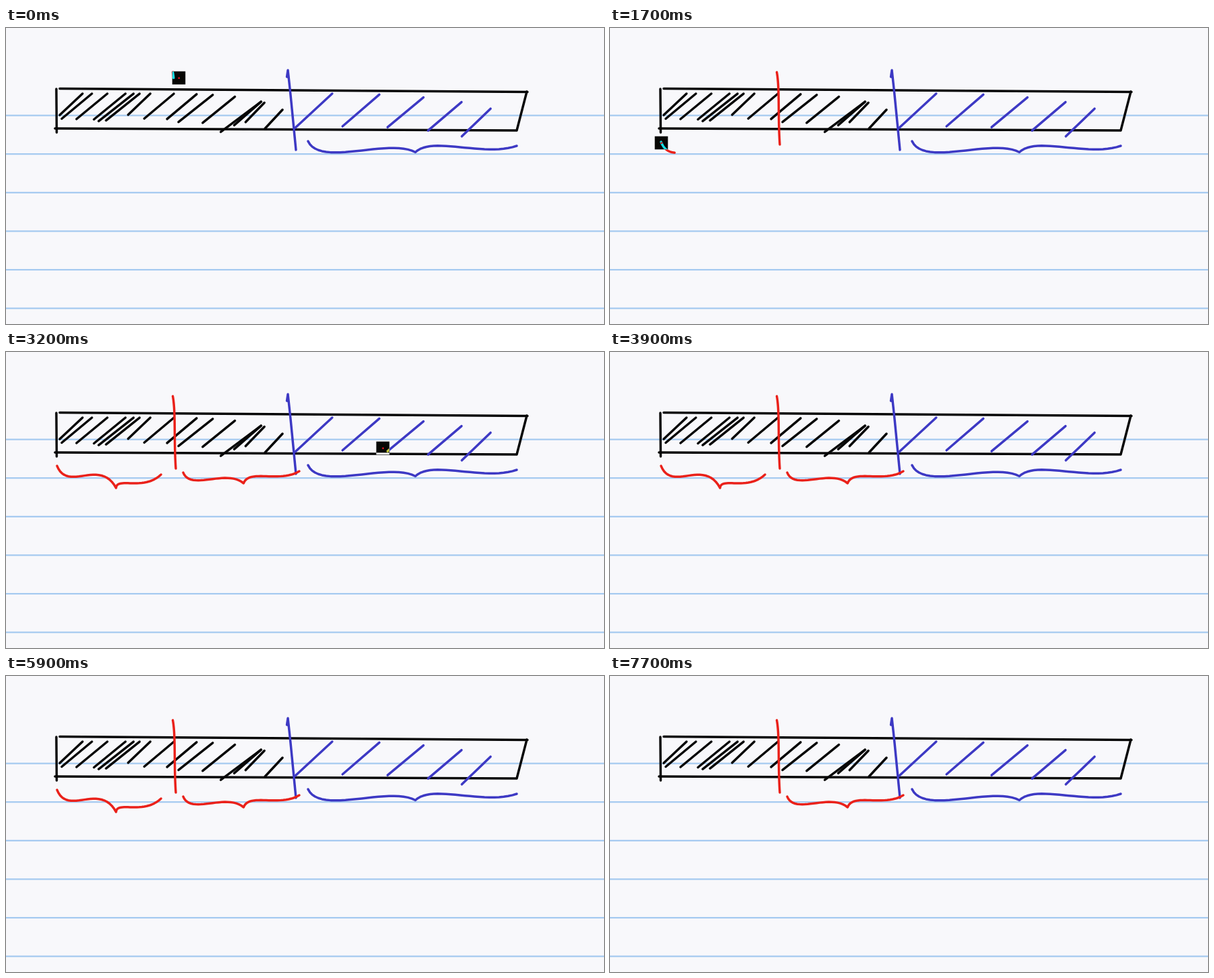
Animation, 891 px wide and 442 px high, one loop 8000 ms. Source, as an HTML page with a canvas:

```html
<!DOCTYPE html>
<html lang="en">
<head>
<meta charset="utf-8">
<title>Hatched bar sketch</title>
<style>
html, body { margin: 0; width: 100%; height: 100%; overflow: hidden; background: #f8f8fb; }
canvas { display: block; width: 891px; height: 442px; filter: blur(0.45px); }
</style>
</head>
<body>
<canvas id="stage" width="891" height="442"></canvas>
<script>
const ctx = document.getElementById('stage').getContext('2d');
const LOOP = 8000, FPS = 5.5, HOLD = 1000;
const INK = '#060606', BLUE = '#3d39c4', RED = '#ea211a', RULE = '#a4c9f0', PAPER = '#f8f8fb';

// Cubic curves: start, two handles, end
const redCut = [[248.5, 66, 253, 90, 250, 130, 253, 174]];
const leftBrace = [[76, 170, 92, 210, 140, 158, 164, 203], [164, 203, 165, 186, 205, 208, 231, 183]];
const midBrace = [[264, 180, 275, 208, 328, 174, 354, 196], [354, 196, 362, 174, 408, 196, 437, 178]];
const blueBrace = [[450, 169, 468, 208, 570, 164, 610, 185.5], [610, 185.5, 635, 161, 712, 193, 761, 176]];

// Pen passes: [step, x, y]; the pen is hidden between them
const passes = [
  [[0, 257.5, 74], [2, 253, 174], [3, 265, 236], [5, 76.5, 171.5], [6, 164, 202], [8, 264, 180],
    [10, 355.5, 196.5], [11, 437, 178], [12, 728, 112], [16, 60, 238]],
  [[21, 529, 408], [23, 143, 75], [24, 163.5, 88.5], [26, 155, 75], [27, 180, 184]],
  [[32, 300, 250], [33, 42, 180], [36, 142, 188], [37, 528, 197]]
];

const clamp = v => Math.max(0, Math.min(1, v));
const progress = (n, a, b) => clamp((n - a) / (b - a));
const mix = (a, b, u) => a + (b - a) * u;

function ink(color, points) {
  ctx.strokeStyle = color;
  ctx.beginPath();
  for (const [x, y] of points) ctx.lineTo(x, y);
  ctx.stroke();
}

function bezier(c, u) {
  const v = 1 - u;
  const axis = k => v * v * v * c[k] + 3 * v * v * u * c[k + 2] + 3 * v * u * u * c[k + 4] + u * u * u * c[k + 6];
  return [axis(0), axis(1)];
}

// Part of a chain of curves, from and to as fractions of the whole
function curve(color, parts, from = 0, to = 1) {
  if (to <= from) return;
  const points = [];
  for (let j = 0; j <= 48; j++) {
    const s = mix(from, to, j / 48) * parts.length;
    const i = Math.min(parts.length - 1, Math.floor(s));
    points.push(bezier(parts[i], s - i));
  }
  ink(color, points);
}

function drawBar() {
  ink(INK, [[75, 91], [75.5, 156]]);
  ink(INK, [[80, 90.5], [777, 95.5]]);
  ink(INK, [[776, 95], [761, 153], [73, 150]]);

  // Black hatching: upper end and width of each line
  const hatch = [[114, 34], [128, 45], [151, 46], [178, 47], [190, 52], [199, 50], [215, 33], [250, 44],
    [284, 44], [308, 51], [341, 48], [380, 60], [380, 40], [385, 28], [412, 26]];
  for (const [x, w] of hatch) {
    const y = 98 + 25 * ((x - 114) / 300) ** 6;
    ink(INK, [[x, y], [x - w, y + 15 + w / 2]]);
  }

  for (let i = 0; i < 5; i++) {
    const x = 431 + 71 * i - 0.56 * i ** 3;
    ink(BLUE, [[x, 149 - 4 * i + 1.8 * i * i], [x + 55 - 0.19 * i ** 3, 98 + 1.4 * i * i]]);
  }
  ink(BLUE, [[418.5, 73], [420, 63], [424, 100], [432, 182]]);
  curve(BLUE, blueBrace);
}

function drawPen(n) {
  const keys = passes.find(p => n >= p[0][0] && n <= p[p.length - 1][0]);
  if (!keys) return;
  const i = Math.max(1, keys.findIndex(k => k[0] >= n));
  const [a, b] = [keys[i - 1], keys[i]];
  const u = progress(n, a[0], b[0]);
  const x = Math.round(mix(a[1], b[1], u) - 9.5), y = Math.round(mix(a[2], b[2], u) - 9.5);
  // The pen inverts whatever lies under it
  ctx.globalCompositeOperation = 'difference';
  ctx.fillStyle = '#fff';
  ctx.fillRect(x - 0.3, y - 0.3, 19.6, 19.6);
  ctx.globalCompositeOperation = 'source-over';
  ctx.fillStyle = '#d8141c';
  ctx.fillRect(x + 8.5, y + 8.5, 2.5, 2.5);
}

// Step number on the frame clock, whose ticks round to 100 ms
function stepAt(t) {
  const tick = Math.floor(t / 100) * 100 + 49.9;
  return Math.max(0, 1 + Math.floor((tick - HOLD) * FPS / 1000));
}

function draw(t) {
  const n = stepAt(t);
  ctx.fillStyle = PAPER;
  ctx.fillRect(0, 0, 891, 442);
  ctx.fillStyle = RULE;
  for (let i = 0; i < 6; i++) ctx.fillRect(0, 129.5 + i * 57.6, 891, 2.2);

  ctx.lineCap = ctx.lineJoin = 'round';
  ctx.lineWidth = 3.5;
  drawBar();
  curve(RED, redCut, 0, progress(n, -0.25, 2));
  curve(RED, leftBrace, progress(n, 33, 38), progress(n, 4.55, 7.7));
  curve(RED, midBrace, 0, progress(n, 9, 11));
  drawPen(n);
}

const start = performance.now();
function frame() {
  draw((performance.now() - start) % LOOP);
  requestAnimationFrame(frame);
}
frame();
</script>
</body>
</html>
```
